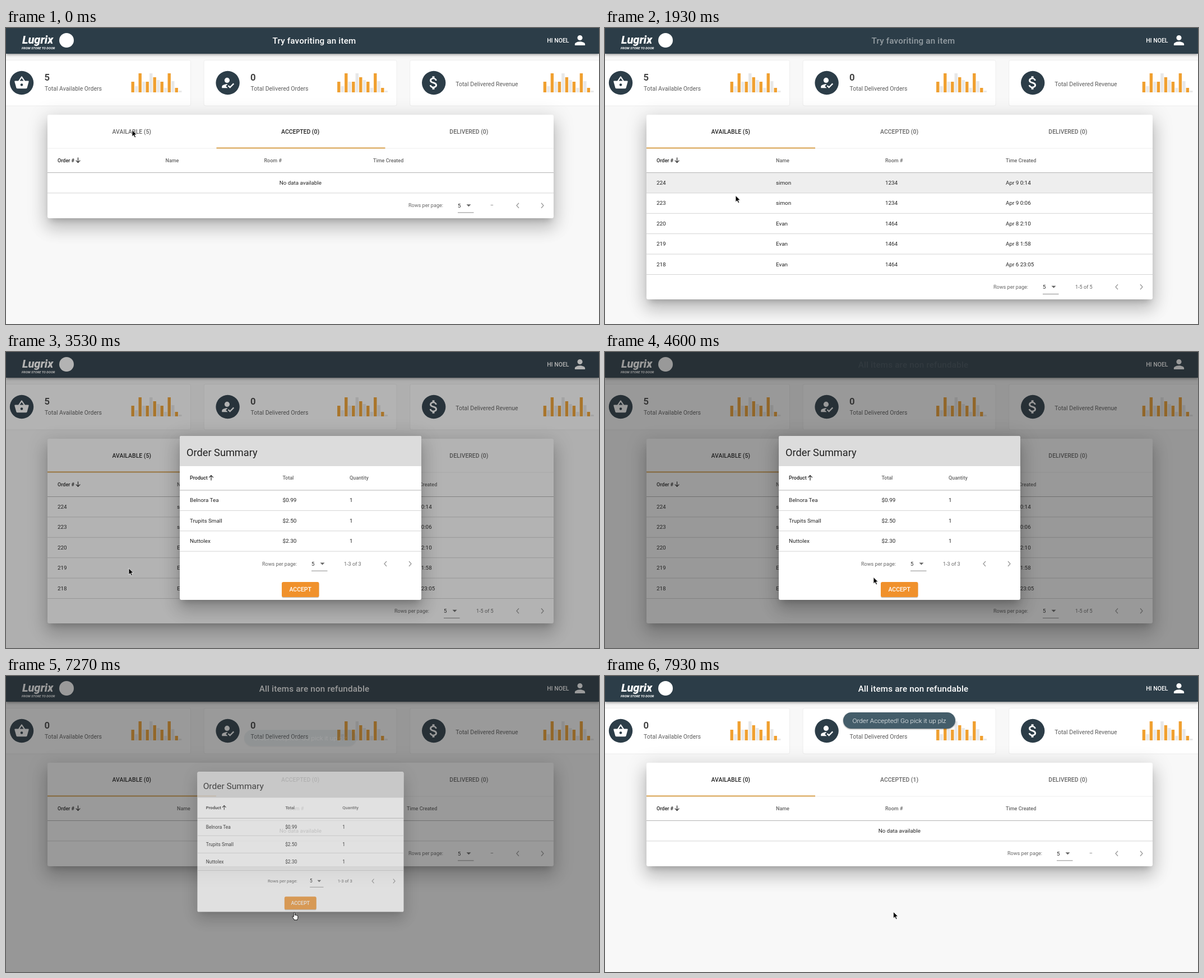
These frames come from a looping animation (1058 px wide and 529 px high, 8 s). An HTML page:

```html
<!DOCTYPE html>
<html lang="en">
<head>
<meta charset="utf-8">
<title>Orders dashboard</title>
<style>
html, body { margin: 0; width: 100%; height: 100%; overflow: hidden; }
body { position: relative; background: #f8f8f8; font-family: Roboto, sans-serif; }
div, svg { position: absolute; }
svg { left: 0; top: 0; display: block; }
text { white-space: pre; }
#bar { left: 0; top: 0; width: 1058px; height: 46px; background: #2c3d48;
  box-shadow: 0 2px 3px -1px #0003, 0 3px 4px #0002, 0 1px 8px #0002; }
#card { left: 74px; top: 155px; width: 903px; overflow: hidden; background: #fff; border-radius: 3px; }
#card, #dialog { box-shadow: 0 8px 11px -5px #0003, 0 18px 29px 2px #00000024, 0 7px 35px 6px #0000001f; }
#scrim { inset: 0; background: #212121; }
#dialog { left: 310px; top: 150px; width: 430.5px; height: 292.5px; background: #fff; border-radius: 3px; overflow: hidden; }
#toast { left: 425px; top: 65px; width: 200px; height: 29px; border-radius: 15px; background: #445d6a;
  box-shadow: 0 1px 3px #0003, 0 1px 2px #0004; }
</style>
</head>
<body>
<div id="bar"></div>
<svg id="base" width="1058" height="529"></svg>
<div id="card"><svg id="cardArt" width="903" height="330" viewBox="74 155 903 330"></svg></div>
<div id="scrim"></div>
<div id="dialog"><svg id="dialogArt" width="430.5" height="292.5" viewBox="310 150 430.5 292.5"></svg></div>
<div id="toast"><svg id="toastArt" width="200" height="29"></svg></div>
<svg id="pointer" width="1058" height="529">
  <path id="arrow" d="M0 0V11.6L2.7 9.1 4.7 13.3 6.6 12.4 4.7 8.3H8.3Z" fill="#000" stroke="#fff" stroke-width=".8"/>
  <path id="hand" d="M-1.2 8V1.1a1.1 1.1 0 0 1 2.2 0V5q1-.9 1.9.3 1.1-.8 1.8.4 1.6-.5 1.6 1.2V9.500q0 1.500-1 2.800V13.500H-.5V12.500L-3.600 8.300q-.5-1.600 1-1.300Z" fill="#fff" stroke="#000" stroke-width=".9"/>
</svg>
<script>
const LOOP = 8000, NAVY = '#2c3d48', INK = '#222', GREY = '#666', ROW = 36.4;
const TAB = 470, OPEN = 3231, CLOSE = 7244;
const $ = id => document.getElementById(id);

// Text placed by the vertical middle of its capitals
const text = (x, cy, str, size, fill = INK, weight = 400, extra = '') =>
  `<text x="${x}" y="${cy + size * .355}" font-size="${size}" fill="${fill}" font-weight="${weight}" ${extra}>${str}</text>`;
const MID = 'text-anchor="middle"';
const rect = (x, y, w, h, fill, extra = '') =>
  `<rect x="${x}" y="${y}" width="${w}" height="${h}" fill="${fill}" ${extra}/>`;
const stroke = (d, color, width = 1.3) => `<path d="${d}" fill="none" stroke="${color}" stroke-width="${width}"/>`;
const icon = (x, y, k, d) => `<path transform="translate(${x} ${y}) scale(${k}) translate(-12 -12)" fill="#fff" d="${d}"/>`;

const PERSON = 'M12 12c2.21 0 4-1.79 4-4s-1.79-4-4-4-4 1.79-4 4 1.79 4 4 4zm0 2c-2.67 0-8 1.34-8 4v2h16v-2c0-2.66-5.33-4-8-4z';
const BASKET = 'M17.2 9l-4.4-6.56a1 1 0 0 0-1.66 0L6.8 9H2a1 1 0 0 0-1 1.27l2.6 9.27A2 2 0 0 0 5.5 21h13a2 2 0 0 0 1.93-1.46L23 10a1 1 0 0 0-1-1zM9 9l3-4.4L15 9zm3 8a2 2 0 1 1 0-4 2 2 0 0 1 0 4z';
const CHECKED = 'M9 17l3-2.94c-.39-.04-.68-.06-1-.06-2.67 0-8 1.34-8 4v2h9zm2-5a4 4 0 1 0 0-8 4 4 0 0 0 0 8M15.47 20.5L12 17l1.4-1.41 2.07 2.08 5.13-5.17 1.4 1.41z';
const DOLLAR = 'M11.8 10.9c-2.27-.59-3-1.2-3-2.15 0-1.09 1.01-1.85 2.7-1.85 1.78 0 2.44.85 2.5 2.1h2.21c-.07-1.72-1.12-3.3-3.21-3.81V3h-3v2.16c-1.94.42-3.5 1.68-3.5 3.61 0 2.31 1.91 3.46 4.7 4.13 2.5.6 3 1.48 3 2.41 0 .69-.49 1.79-2.7 1.79-2.06 0-2.87-.92-2.98-2.1h-2.2c.12 2.19 1.76 3.42 3.68 3.83V21h3v-2.15c1.95-.37 3.5-1.5 3.5-3.55 0-2.84-2.43-3.81-4.7-4.4z';
const BARS = [19, 11, 34, 19, 19, 34, 27, 22, 19, 8, 34, 20, 8, 3];

function stat(i, label, count, path, k) {
  const x = 28 + i * 367.6;
  return rect(x - 42.5, 57.5, 344, 81.5, '#fff', 'rx="3" stroke="#eee"') +
    `<circle cx="${x}" cy="98" r="21.2" fill="${NAVY}"/>` + icon(x, 98, k, path) +
    (count ? text(x + 40.5, 88, count, 16.7, '#444', 700, `id="count${i}"`) : '') +
    text(x + (count ? 41 : 39), count ? 108.5 : 100, label, 10.5, '#5c5c5c') +
    BARS.map((h, n) => rect(x + 195.5 + n * 6.5, 115 - h, 5.4, h, n % 2 ? '#e8e8e8' : '#f0a030')).join('');
}

function pager(x, cy, range, prev, next) {
  const chevron = (cx, d) => stroke(`M${cx - 2 * d} ${cy - 4.5}l${4 * d} 4.5 ${-4 * d} 4.5`, '#999');
  return text(x, cy, 'Rows per page:', 9.1, GREY) + text(x + 88, cy, '5', 9.6, INK) +
    `<path d="M${x + 103.5} ${cy - 2}h8l-4 4z" fill="#666"/>` +
    stroke(`M${x + 88} ${cy + 12.7}h28.5`, '#8a8a8a', 1) +
    text(x + 146, cy, range, 9.1, GREY) + chevron(prev, -1) + chevron(next, 1);
}

// Table: heads, ruled rows and a pager; no rows gives the empty notice
function grid({ left, right, cols, heads, rows, headY, top, arrow, page }) {
  let out = heads.map((h, i) => text(cols[i], headY, h, 9, i ? GREY : INK, 500)).join('') +
    stroke(arrow, INK, 1.2) + stroke(`M${left} ${top}H${right}`, '#b4b4b4', 1);
  const lines = Math.max(rows.length, 1);
  if (!rows.length) out += text(525.3, top + 18, 'No data available', 9.8, INK, 400, MID);
  for (let r = 0; r < lines; r++) {
    const y = top + r * ROW;
    out += (rows[r] || []).map((s, i) => text(cols[i], y + 18, s, 9.85)).join('') +
      stroke(`M${left} ${y + ROW}H${right}`, '#d4d4d4', 1);
  }
  return out + pager(page[0], top + lines * ROW + 22.3, ...page.slice(1));
}
const orders = (cols, rows) => grid({
  left: 74, right: 977, cols, rows, headY: 236.7, top: 258.5,
  heads: ['Order #', 'Name', 'Room #', 'Time Created'],
  arrow: 'M128.5 231.500v9m-3.800-3.800l3.800 3.800 3.800-3.800',
  page: rows.length ? [693, '1-5 of 5', 913, 957] : [718, '–', 913, 957]
});

$('base').innerHTML =
  `<circle cx="108" cy="22" r="13" fill="#fff"/>` +
  text(29, 21, 'Lugrix', 20, '#fff', 800, 'font-style="italic"') +
  text(28, 35.500, 'FROM STORE TO DOOR', 5.8, '#fff', 700, 'font-style="italic"') +
  text(550, 22.5, '', 15.2, '#fff', 500, MID + ' id="headline" letter-spacing=".19"') +
  text(1004.5, 22.3, 'HI NOEL', 10.5, '#fff', 500, 'text-anchor="end"') +
  icon(1024, 22, 1.14, PERSON) +
  stat(0, 'Total Available Orders', '5', BASKET, 1.15) +
  stat(1, 'Total Delivered Orders', '0', CHECKED, 1.15) +
  stat(2, 'Total Delivered Revenue', '', DOLLAR, 1.3);

const wide = [92, 305, 500, 715];
$('cardArt').innerHTML =
  ['AVAILABLE', 'ACCEPTED', 'DELIVERED (0)'].map((s, i) =>
    text(224.3 + i * 300.8, 185.500, s, 10.45, GREY, 500, `${MID} id="tab${i}"`)).join('') +
  stroke('M74 215H977', '#eee', 1) + rect(0, 213.5, 301, 2, '#d9a24f', 'id="slider"') +
  `<g id="accepted">${orders([92, 284.5, 460.5, 655], [])}</g>` +
  `<g id="full">${rect(74, 0, 903, ROW, '#eee', 'id="hover"')}${orders(wide, [
    ['224', 'simon', '1234', 'Apr 9 0:14'],
    ['223', 'simon', '1234', 'Apr 9 0:06'],
    ['220', 'Evan', '1464', 'Apr 8 2:10'],
    ['219', 'Evan', '1464', 'Apr 8 1:58'],
    ['218', 'Evan', '1464', 'Apr 6 23:05']])}</g>` +
  `<g id="none">${orders(wide, [])}</g>`;

$('dialogArt').innerHTML =
  rect(310, 150, 431, 54, '#dcdcdc') + text(322, 180, 'Order Summary', 18.2) +
  grid({
    left: 310, right: 741, cols: [328, 493.5, 613], headY: 225.2, top: 247,
    heads: ['Product', 'Total', 'Quantity'],
    rows: [['Belnora Tea', '$0.99', '1'], ['Trupits Small', '$2.50', '1'], ['Nuttolex', '$2.30', '1']],
    arrow: 'M366 229.500v-9m-3.800 3.800l3.800-3.800 3.800 3.800',
    page: [457, '1-3 of 3', 677, 721]
  }) +
  rect(492, 412.5, 66.5, 27, '#0003', 'rx="3"') + rect(492, 411, 66.5, 27, '#f0912c', 'rx="3" id="button"') +
  text(525.2, 424.5, 'ACCEPT', 10.45, '#fff', 500, MID);

$('toastArt').innerHTML = text(100, 15, 'Order Accepted! Go pick it up plz', 11.8, '#fff', 300, MID);

const clamp = v => Math.min(1, Math.max(0, v));
const span = (t, start, length) => clamp((t - start) / length);
const smooth = p => p * p * (3 - 2 * p);
function bezier(x1, y1, x2, y2, p) {
  const at = (a, b, s) => 3 * (1 - s) * s * ((1 - s) * a + s * b) + s ** 3;
  let lo = 0, hi = 1;
  for (let i = 0; i < 20; i++) {
    const s = (lo + hi) / 2;
    if (at(x1, x2, s) < p) lo = s; else hi = s;
  }
  return at(y1, y2, lo);
}
const swift = p => bezier(.25, .8, .25, 1, p);

// Pointer stops: time, x, y
const STOPS = [[0, 225, 182.5], [850, 225, 182.5], [1400, 232, 286], [1730, 233, 292], [1930, 233, 299.5],
  [2500, 220, 394], [2800, 219, 386.5], [3900, 219, 386.5], [4600, 479, 402.5], [5050, 514.5, 421.5], [LOOP, 514.5, 421.5]];
function pointerAt(t) {
  const i = Math.max(1, STOPS.findIndex(s => s[0] >= t));
  const [t0, x0, y0] = STOPS[i - 1], [t1, x1, y1] = STOPS[i];
  const p = smooth(span(t, t0, t1 - t0));
  return [x0 + (x1 - x0) * p, y0 + (y1 - y0) * p];
}
const show = (id, on) => $(id).setAttribute('display', on ? 'inline' : 'none');

function draw(t) {
  const done = t >= CLOSE;
  $('headline').textContent = t < 3500 ? 'Try favoriting an item' : 'All items are non refundable';
  $('headline').setAttribute('opacity', t < 3500 ? 1 - smooth(span(t, 1400, 1050)) : smooth(span(t, 4420, 1000)));
  $('count0').textContent = done ? 0 : 5;

  const switched = t >= TAB, slide = bezier(.25, .8, .5, 1, span(t, TAB, 300));
  $('tab0').textContent = `AVAILABLE (${done ? 0 : 5})`;
  $('tab1').textContent = `ACCEPTED (${t >= 7900 ? 1 : 0})`;
  $('tab0').setAttribute('fill', switched ? INK : GREY);
  $('tab1').setAttribute('fill', switched ? GREY : INK);
  $('slider').setAttribute('x', 375.5 - 301.5 * slide);
  $('accepted').setAttribute('transform', `translate(${903 * slide})`);
  $('full').setAttribute('transform', `translate(${903 * (slide - 1)})`);
  show('accepted', slide < 1);
  show('full', switched && !done);
  show('none', done);
  $('card').style.height = (done ? 184.5 : 184.5 + 145.5 * slide) + 'px';

  const row = Math.floor((pointerAt(Math.max(0, t - 200))[1] - 258.5) / ROW);
  show('hover', row >= 0 && t < OPEN);
  $('hover').setAttribute('y', 258.5 + row * ROW);

  const open = swift(span(t, OPEN, 300)) - swift(span(t, CLOSE, 300));
  $('dialog').style.opacity = open;
  $('dialog').style.transform = `scale(${.5 + open / 2})`;
  $('scrim').style.opacity = .46 * (smooth(span(t, OPEN, 450)) - smooth(span(t, CLOSE, 450)));

  const left = (1 - span(t, 7260, 300)) ** 3;
  $('toast').style.opacity = 1 - left;
  $('toast').style.transform = `translateY(${35 * left}px)`;

  const [x, y] = pointerAt(t);
  const onButton = t > 5000 && t < 7650, hand = onButton || (t > 130 && t < 900);
  $('button').setAttribute('fill', onButton ? '#f29b3b' : '#f0912c');
  show('hand', hand);
  show('arrow', !hand);
  $(hand ? 'hand' : 'arrow').setAttribute('transform', `translate(${x} ${y + (hand ? 1 : 0)})`);
}

const begin = performance.now();
function tick() {
  draw((performance.now() - begin) % LOOP);
  requestAnimationFrame(tick);
}
tick();
</script>
</body>
</html>
```
